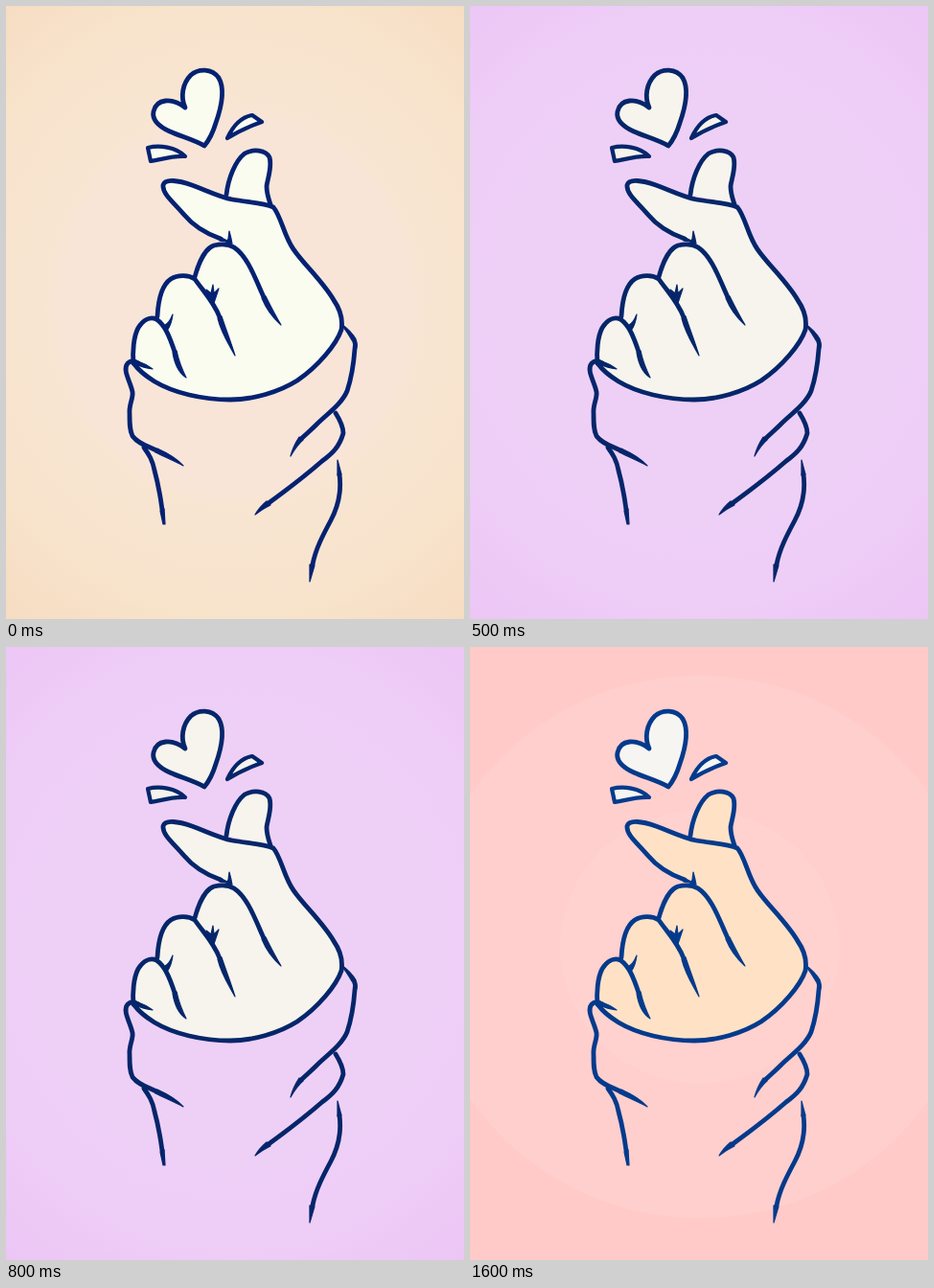
An HTML page without scripts that plays this animation: 478x640 px, repeating every 2 s.

```html
<!DOCTYPE html>
<html lang="en">
<head>
<meta charset="utf-8">
<title>Finger heart</title>
<style>
  html, body { margin: 0; width: 100%; height: 100%; overflow: hidden; }
  svg { display: block; width: 100%; height: 100%; }

  /* Three colour schemes, switched without blending */
  .scene { animation: scheme 2s step-end infinite; background: var(--bg); }
  @keyframes scheme {
    0% {
      --ink: #042272; --skin: #fafcf0; --heart: #fafcf0;
      --bg: radial-gradient(390px 420px at 240px 313px, #f8e5d8 46%, #f8e5d2 50%, #f8e4cd 72%, #f6dcc1);
    }
    25% {
      --ink: #05266a; --skin: #f6f4ec; --heart: #f6f4ec;
      --bg: radial-gradient(390px 420px at 240px 313px, #eed0f6 45%, #eecdf7 75%, #ecc5f5);
    }
    50%, 100% {
      --ink: #043a8c; --skin: #ffe2c5; --heart: #f6f5f2;
      --bg: radial-gradient(290px 284px at 240px 313px, #ffd1cf 50%, #ffcfcd 50.5% 99.5%, #ffcac7 100%);
    }
  }

  .line { fill: none; stroke: var(--ink); stroke-width: 4.8; stroke-linecap: round; stroke-linejoin: round; }
  .thin { stroke-width: 4.2; }
  .skin { fill: var(--skin); }
  .heart { fill: var(--heart); }
  .taper { fill: var(--ink); stroke: var(--ink); stroke-width: 1.2; stroke-linejoin: round; }
</style>
</head>
<body>
<svg class="scene" viewBox="0 0 478 640" preserveAspectRatio="none" role="img" aria-label="Hand making a finger heart">
  <!-- heart and sparks -->
  <path class="line heart" d="M207 146C197 140 182 136 171 131C160 126 152 119 154 110C157 97 173 95 187 106C182 95 184 81 193 72C201 65 215 65 222 75C229 87 225 105 219 122C216 132 212 140 207 146Z"/>
  <path class="line thin heart" d="M231 138C237 125 246 116 257 114L267 121C253 126 242 131 231 138Z"/>
  <path class="line thin heart" d="M148 148C160 145 177 147 187 157C176 156 162 160 151 162Z"/>

  <!-- thumb -->
  <path class="line skin" d="M230 197C232 180 239 162 249 154C258 149 271 150 275 158C278 168 273 180 272 188C272 196 274 201 276 207"/>

  <!-- hand -->
  <path class="skin" d="M234 246C214 241 196 230 186 218C175 205 163 196 164 187C166 180 180 182 194 187C210 193 224 200 236 202C252 205 268 205 279 210C287 219 290 240 300 254C312 271 331 288 342 307C349 317 352 326 350 338C345 353 326 376 304 391C285 403 258 411 234 411C205 411 175 404 155 392C146 387 138 380 133 373C132 362 133 345 138 336C143 328 150 324 157 327C159 305 163 291 172 285C180 280 191 281 197 285C201 268 208 253 217 250C226 248 233 249 238 252Z"/>
  <path class="line" d="M224 243C207 237 195 229 186 218C175 205 163 196 164 187C166 180 180 182 194 187C210 193 224 200 236 202C252 205 268 205 279 210C287 219 290 240 300 254C312 271 331 288 342 307C349 317 352 326 350 338C345 353 326 376 304 391C285 403 258 411 234 411C205 411 175 404 155 392C147 387 139 381 134 374"/>
  <path class="line" d="M133 373C132 362 133 345 138 336C143 328 150 324 157 327C166 333 171 346 176 361"/>
  <path class="line" d="M158 324C159 305 163 291 172 285C180 280 191 281 197 285C206 298 217 309 223 325"/>
  <path class="line" d="M197 283C201 268 208 253 217 250C226 248 233 249 238 252C253 262 261 287 269 304"/>
  <path class="taper" d="M223 241L235 247L223 245Z"/>
  <path class="taper" d="M178 360C181 374 184 380 188 388C180 383 176 374 174 362Z"/>
  <path class="taper" d="M225 324C230 339 234 349 239 365C231 350 225 342 221 326Z"/>
  <path class="taper" d="M271 303C276 313 281 323 287 333C278 325 271 315 267 305Z"/>

  <!-- creases -->
  <path class="taper" d="M233 235L235 243L236 248L230 247L232 243Z"/>
  <path class="taper" d="M216 291L217 300L222 295L219 304L217 310L213 306L209 296L214 300Z"/>
  <path class="taper" d="M174 322C173 330 171 335 168 339L166 333C170 331 172 327 174 322Z"/>

  <!-- sleeve, left -->
  <path class="line" d="M138 373C134 370 130 370 127 373C121 380 130 392 132 403C133 410 128 416 129 426C129 436 129 443 132 449C138 457 147 459 157 464"/>
  <path class="taper" d="M138 371C144 373 149 376 153 379C147 378 142 377 137 375Z"/>
  <path class="taper" d="M158 462C169 467 178 472 185 480C176 475 166 471 156 466Z"/>
  <path class="line" d="M144 461C149 468 153 474 155 485C160 503 161 512 163 526"/>
  <path class="taper" d="M165 525L166 541L164 541L161 527Z"/>

  <!-- sleeve, right -->
  <path class="taper" d="M350 332C357 337 362 342 365 348L361 349C358 343 354 338 350 332Z"/>
  <path class="line" d="M363 348C365 352 365 355 364 358C363 372 360 390 356 402C350 416 335 426 324 437C318 443 313 447 308 452"/>
  <path class="taper" d="M310 453C304 458 301 463 297 470C299 462 302 456 306 450Z"/>
  <path class="line" d="M344 425C349 433 352 440 352 446C348 460 341 467 330 475C314 489 296 503 274 519"/>
  <path class="taper" d="M276 521C270 524 265 527 260 531C263 526 267 521 272 517Z"/>
  <path class="taper" d="M346 474L350 489L346 490Z"/>
  <path class="line" d="M348 489C350 504 348 520 339 537C331 552 323 567 320 583"/>
  <path class="taper" d="M322 584L317 601L317 583Z"/>
</svg>
</body>
</html>
```
